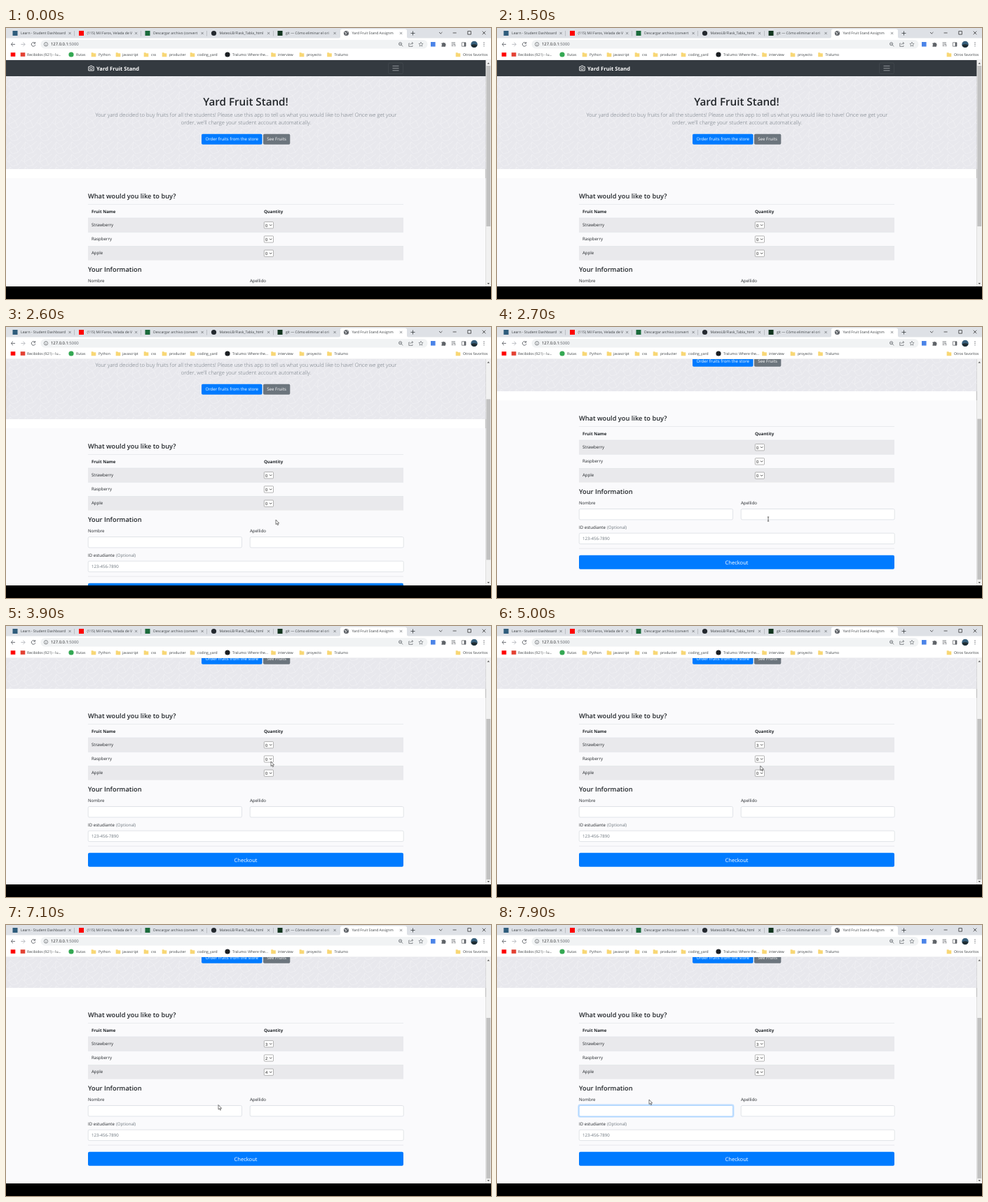
An HTML page that plays this animation: 692 px wide and 388 px high, repeating every 8 s.

```html
<!DOCTYPE html>
<html lang="es">
<head>
<meta charset="utf-8">
<title>Yard Fruit Stand</title>
<style>
html, body { margin: 0; width: 100%; height: 100%; overflow: hidden; background: #000; }
svg { display: block; width: 692px; height: 388px; }
text { font-family: "Open Sans", "Noto Sans", sans-serif; text-rendering: geometricPrecision; white-space: pre; }
</style>
</head>
<body>
<svg id="stage" viewBox="0 0 692 388">
  <defs>
    <pattern id="weave" width="22" height="18" patternUnits="userSpaceOnUse">
      <path d="M0 9L6 1L13 7L22 0M6 1L4 12L13 7L17 16L22 9M4 12L9 18L17 16M0 9L4 12"
            fill="none" stroke="#f3f3f6" stroke-width=".7"/>
    </pattern>
    <clipPath id="view"><rect y="46" width="684.6" height="324"/></clipPath>
  </defs>
  <g clip-path="url(#view)"><g id="page"></g></g>
  <g id="chrome"></g>
  <g id="pointer">
    <path id="arrow" d="M0 0V6.6L1.5 5.3L2.6 7.7L3.6 7.2L2.6 4.9H4.6Z" fill="#fff" stroke="#222" stroke-width=".6"/>
    <path id="beam" d="M-1.2 -3H1.2M0 -3V3M-1.2 3H1.2" fill="none" stroke="#333" stroke-width=".7"/>
  </g>
</svg>
<script>
const NS = "http://www.w3.org/2000/svg";
const $ = id => document.getElementById(id);
const page = $("page"), chrome = $("chrome");
let root = page;

function el(tag, attrs) {
  const node = document.createElementNS(NS, tag);
  for (const k in attrs) node.setAttribute(k, attrs[k]);
  return root.appendChild(node);
}
const box = (x, y, width, height, fill, more) => el("rect", { x, y, width, height, fill, ...more });
const dot = (cx, cy, r, fill) => el("circle", { cx, cy, r, fill });
const line = (d, stroke = "#5f6368", w = 0.8, more) =>
  el("path", { d, stroke, "stroke-width": w, fill: "none", ...more });
function label(x, y, str, size, fill = "#212529", weight = 400, anchor = "start") {
  const t = el("text", { x, y, fill, "font-size": size, "font-weight": weight, "text-anchor": anchor });
  t.textContent = str;
  return t;
}
const cross = (x, y, r, color) =>
  line(`M${x - r} ${y - r}L${x + r} ${y + r}M${x + r} ${y - r}L${x - r} ${y + r}`, color, 0.7);

// ---- web page, in document coordinates at scroll 0
const BODY = 6.1, LEAD = 7.6, H3 = 9.25;

box(0, 40, 685, 460, "#fff");
box(0, 69, 685, 133, "#e8e8ed");
box(0, 69, 685, 133, "url(#weave)", { opacity: 0.75 });
box(0, 215, 685, 290, "#fafafc");
box(0, 46, 685, 23, "#343a40");

// brand
line("M117.8 55.4H119.4L120.2 54.2H122.8L123.6 55.4H125.2V61H117.8Z", "#fff", 0.9);
el("circle", { cx: 121.5, cy: 58, r: 1.7, fill: "none", stroke: "#fff", "stroke-width": 0.8 });
label(129, 60.6, "Yard Fruit Stand", LEAD, "#fff", 700);
box(545.5, 50, 21, 15.5, "none", { rx: 2, stroke: "#4a5056", "stroke-width": 0.5 });
line("M551.5 54.4H560.5M551.5 57.6H560.5M551.5 60.8H560.5", "#a9acb0", 0.8);

// hero
label(342, 111.2, "Yard Fruit Stand!", 15.2, "#212529", 600, "middle");
label(342.5, 126.6, "Your yard decided to buy fruits for all the students! Please use this app to tell us what you would like to have! Once we get your", LEAD, "#6c757d", 300, "middle");
label(342.5, 138.4, "order, we'll charge your student account automatically.", LEAD, "#6c757d", 300, "middle");
box(279, 151.7, 86.5, 15, "#007bff", { rx: 1.7 });
label(322.2, 161.4, "Order fruits from the store", BODY, "#fff", 400, "middle");
box(367, 151.7, 38.3, 15, "#6c757d", { rx: 1.7 });
label(386.1, 161.4, "See Fruits", BODY, "#fff", 400, "middle");

// order table
label(117, 244.2, "What would you like to buy?", H3, "#212529", 600);
box(117, 252, 450, 0.6, "#dee2e6");
label(122, 264.8, "Fruit Name", BODY, "#212529", 700);
label(368, 264.8, "Quantity", BODY, "#212529", 700);

const rows = [
  { name: "Strawberry", value: 3, at: 4300 },
  { name: "Raspberry", value: 2, at: 5400 },
  { name: "Apple", value: 4, at: 6500 }
];
rows.forEach((row, i) => {
  const y = 272 + i * 20.2;
  if (i % 2 === 0) box(117, y, 450, 20.2, "#e9e9ec");
  box(117, y - 0.3, 450, 0.6, "#dee2e6");
  label(122, y + 12, row.name, BODY);
  box(368.3, y + 5.6, 13.2, 9.3, "#fff", { rx: 1, stroke: "#858585", "stroke-width": 0.6 });
  row.text = label(369.9, y + 12.5, "0", 5.8, "#111");
  line(`M376 ${y + 9.4}l1.6 1.6l1.6 -1.6`, "#222", 0.8);
});

// form
const INK = "#495057";
const field = (x, y, w) => box(x, y, w, 15.4, "#fff", { rx: 1.8, stroke: "#ced4da", "stroke-width": 0.6 });
label(117, 348.8, "Your Information", H3, "#212529", 600);
label(117, 364.4, "Nombre", BODY);
label(348, 364.4, "Apellido", BODY);
const glow = box(116.2, 369.4, 221.4, 17.4, "none", { rx: 2.6, stroke: "#bfdeff", "stroke-width": 1.6 });
const nameField = field(117.2, 370.5, 219.3);
field(348.2, 370.5, 219);
const caret = box(122.3, 374, 0.6, 8.4, INK);
label(117, 399.3, "ID estudiante", BODY);
label(157, 399.3, "(Optional)", BODY, "#6c757d");
field(117.2, 405.2, 450);
label(122, 415.1, "123-456-7890", BODY, "#6c757d");
box(117, 426.8, 450, 0.6, "#dcdce0");
box(117, 436.8, 450, 20, "#007bff", { rx: 2 });
label(342, 449.6, "Checkout", LEAD, "#fff", 400, "middle");

// ---- browser window
root = chrome;
const UI = 5.1, GREY = "#5f6368", DARK = "#3c4043";

box(0, 0, 692, 15, "#dee1e6");
box(0, 14.5, 692, 31.5, "#fff");
box(0, 45.5, 692, 0.5, "#e4e6e9");
el("path", { d: "M474 15Q477 15 477 12V4Q477 1.5 480 1.5H569Q572 1.5 572 4V12Q572 15 575 15Z", fill: "#fff" });

const tabs = [
  ["Learn - Student Dashboard", "#2f5d7c"],
  ["(115) Mil Faros, Velada de V", "#f00"],
  ["Descargar archivo (convert", "#1c6b3c"],
  ["MateoLB/Flask_Tabla_html", "#24292f"],
  ["git — Cómo eliminar el ori", "#12351f"],
  ["Yard Fruit Stand Assignm", GREY]
];
tabs.forEach(([title, color], i) => {
  const x = 9.5 + i * 94.5;
  if (i === 3) dot(x + 3.5, 7.5, 3.6, color);
  else if (i < 5) box(x, 4, 7, 7, color);
  else {
    dot(x + 3.5, 7.5, 3.6, color);
    line(`M${x + 1} 6l2.4 1.2l-.6 2.2M${x + 4.5} 4.8l1.2 1.6`, "#fff", 0.9);
  }
  label(x + 11.5, 9.3, title, UI, DARK);
  cross(x + 81.6, 7.5, 1.6, GREY);
  if (i < 4) box(x + 88, 4, 0.5, 7.5, "#9a9da2");
});
line("M577.5 7.5H583.5M580.5 4.5V10.5", DARK, 0.8);
line("M618 6l2.2 2.2l2.2 -2.2M637.6 7H642.6M658.8 4.6H663.4V9.2H658.8Z", "#222", 0.7);
cross(682, 7, 2.3, "#222");

// toolbar
line("M13 23.4H7.4M10 20.6L7.2 23.4L10 26.2", GREY, 0.9);
line("M21.4 23.4H27M24.4 20.6L27.2 23.4L24.4 26.2", "#b4b7bb", 0.9);
line("M41 21.4A2.8 2.8 0 1 0 41.8 24M41.6 20V22.2H39.4", GREY, 0.9);
box(49.5, 17, 552, 12.6, "#f1f3f4", { rx: 6.3 });
el("circle", { cx: 57, cy: 23.3, r: 2.7, fill: "none", stroke: GREY, "stroke-width": 0.7 });
line("M57 23V24.8M57 21.6V22.2", GREY, 0.7);
label(64, 25.4, "127.0.0.1", 5.9, "#202124");
label(88.6, 25.4, ":5000", 5.9, GREY);
el("circle", { cx: 562.6, cy: 22.8, r: 2.1, fill: "none", stroke: GREY, "stroke-width": 0.8 });
line("M564.2 24.4L566.2 26.4M561.6 22.8H563.6", GREY, 0.8);
line("M576 22H574.8V26.4H580V25M576.6 24.2Q577 21.8 580.6 21.8M579 20.2L580.8 21.8L579 23.4", GREY, 0.7);
line("M592 20.2l.9 2.1l2.2 .2l-1.7 1.5l.5 2.2l-1.9 -1.2l-1.9 1.2l.5 -2.2l-1.7 -1.5l2.2 -.2Z", GREY, 0.6);
box(606, 20, 6.6, 6.6, "#4b84e8");
el("path", { d: "M621.5 21.4H623.2A1.2 1.2 0 0 1 625.4 21.4H627V23A1.2 1.2 0 0 1 627 25.2V26.8H621.5V25A1.2 1.2 0 0 0 621.5 23Z", fill: GREY });
line("M635.6 21H641M635.6 23.2H641M635.6 25.4H638.6M640.6 23.6V26.4", GREY, 0.8);
line("M650.4 20.8H656V26.2H650.4Z", GREY, 0.7);
box(653.6, 20.8, 2.4, 5.4, GREY);
dot(668, 23.4, 4.7, "#38607c");
el("path", { d: "M663.5 24.6Q668 21.8 672.5 24.6A4.7 4.7 0 0 1 663.5 24.6Z", fill: "#1f2d33" });
[21, 23.4, 25.8].forEach(y => dot(682, y, 0.65, GREY));

// bookmarks: icon x, text x, title, icon colour (none means folder)
const marks = [
  [10, 17, "", "#f00"],
  [24, 30, "Recibidos (921) - lu…", "#e34133"],
  [93, 100, "Rutas", "#34a853", true],
  [125, 132, "Python"],
  [160, 166, "javascript"],
  [200, 207, "css"],
  [226, 233, "producter"],
  [266, 273, "coding_yard"],
  [316, 323, "Tralumo: Where the...", "#1b1f23", true],
  [381.5, 388, "interview"],
  [422, 429, "proyecto"],
  [461.5, 468.5, "Tralumo"],
  [645, 652, "Otros favoritos"]
];
marks.forEach(([x, tx, title, color, round]) => {
  if (round) dot(x, 38, 3.6, color);
  else if (color) box(x - 3.3, 35.2, 6.6, 5.6, color);
  else el("path", { d: `M${x - 3.3} 35.2h2.6l.9 1h3.1v5h-6.6Z`, fill: "#f8d775" });
  label(tx, 39.9, title, UI, DARK);
});

// scrollbar and bottom strip
box(684.6, 46, 7.4, 324, "#f1f1f1");
const thumb = box(685.4, 54, 5.8, 230, "#c1c1c1");
el("path", { d: "M686.6 51.4L688.3 49.4L690 51.4Z", fill: "#505050" });
el("path", { d: "M686.6 365L688.3 367L690 365Z", fill: "#505050" });
box(0, 370, 692, 18, "#000");

// ---- motion
const LOOP = 8000, STEP = 100;
const scrollKeys = [[2400, 0], [2500, 6], [2600, 70], [2700, 110], [2800, 112]];
const pointerKeys = [
  [1500, 690, -14], [1600, 668, 4], [1800, 470, 200], [2000, 386, 290], [2200, 386, 288],
  [2500, 383, 277], [2700, 387, 275], [3000, 392, 196], [3100, 390, 193], [3500, 375, 176],
  [3700, 376, 179], [3900, 378, 194], [4100, 378, 203], [4500, 378, 203], [4600, 375, 192],
  [4800, 375, 191], [5300, 377, 214], [5500, 376, 218], [5700, 376, 218], [5800, 376, 211],
  [6100, 376, 209], [6300, 376, 209], [6600, 375, 251], [6800, 374, 253], [6900, 374, 253],
  [7300, 232, 262], [7500, 224, 252], [7700, 224, 252], [7900, 217, 250]
];

function sample(keys, t) {
  const i = keys.findIndex(k => k[0] > t);
  if (i === 0) return keys[0].slice(1);
  if (i < 0) return keys[keys.length - 1].slice(1);
  const a = keys[i - 1], b = keys[i], p = (t - a[0]) / (b[0] - a[0]);
  return a.slice(1).map((v, n) => v + (b[n + 1] - v) * p);
}
const show = (node, on) => node.setAttribute("visibility", on ? "visible" : "hidden");

function draw(ms) {
  const t = Math.floor((ms % LOOP) / STEP) * STEP;
  const [scroll] = sample(scrollKeys, t);
  page.setAttribute("transform", `translate(0 ${-scroll})`);
  thumb.setAttribute("y", 54 + scroll * 0.705);

  for (const r of rows) r.text.textContent = t >= r.at ? r.value : 0;

  const focused = t >= 7400;
  show(glow, focused);
  show(caret, focused && (t - 7400) % 1000 < 500);
  nameField.setAttribute("stroke", focused ? "#80bdff" : "#ced4da");

  const [x, y] = sample(pointerKeys, t);
  const inField = scroll > 100 && y > 258 && y < 276 && (x < 337 || x > 348);
  $("pointer").setAttribute("transform", `translate(${x} ${y})`);
  show($("arrow"), !inField);
  show($("beam"), inField);
}

const start = performance.now();
function tick() {
  draw(performance.now() - start);
  requestAnimationFrame(tick);
}
tick();
</script>
</body>
</html>
```
